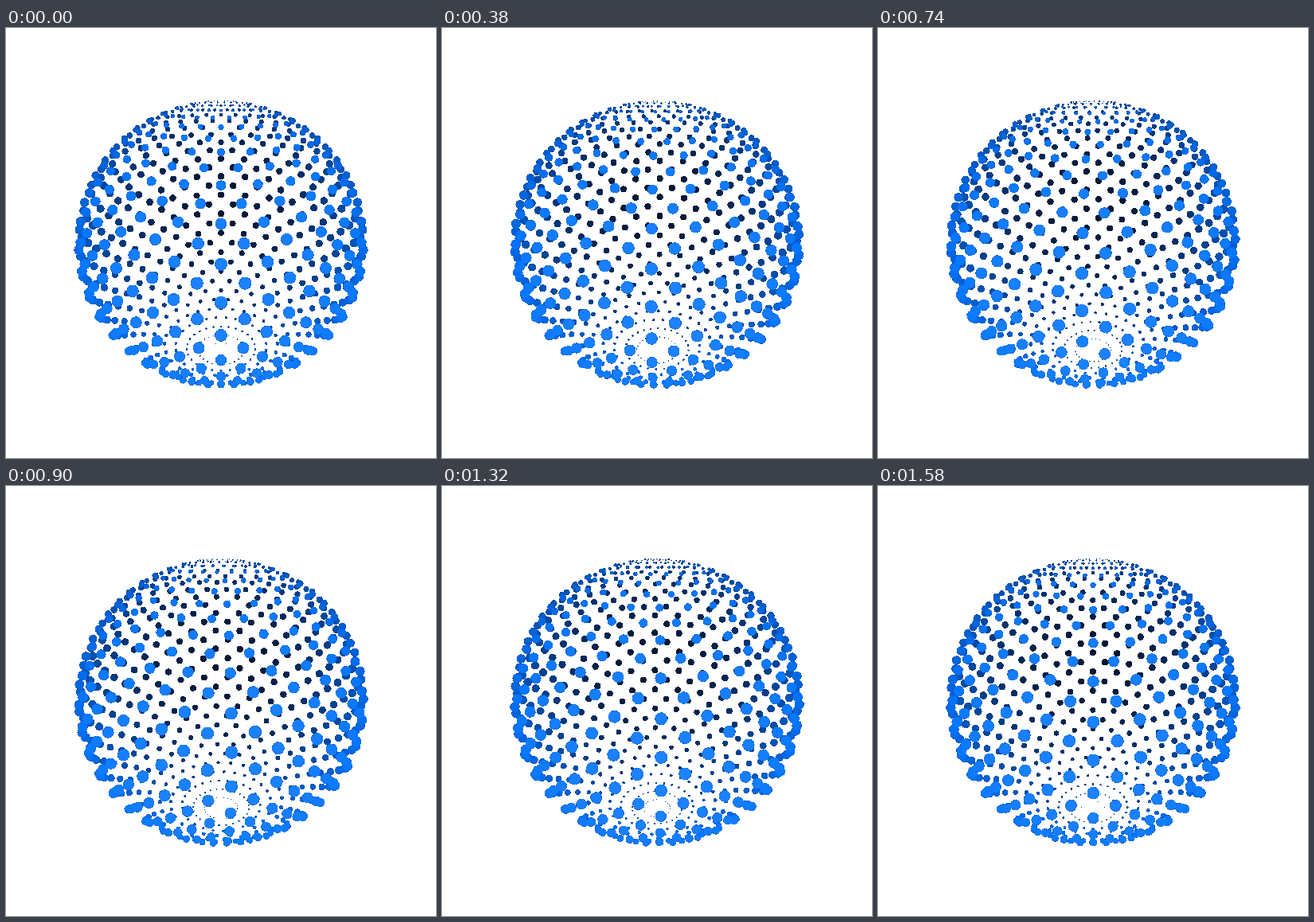
These frames come from a looping animation (540 by 540 pixels, 1.6 s). An HTML page with a canvas:

```html
<!DOCTYPE html>
<html lang="en">
<head>
<meta charset="utf-8">
<title>Dotted sphere</title>
<style>
  html, body { margin: 0; height: 100%; overflow: hidden; background: #fff; }
  canvas { display: block; }
</style>
</head>
<body>
<canvas id="stage" width="540" height="540"></canvas>
<script>
const SIZE = 540, CENTER = SIZE / 2;
const ctx = document.getElementById('stage').getContext('2d', { willReadFrequently: true });
const LOOP = 1600, STEP = 20;
const ROWS = 32, PER_ROW = 26;
const FOCAL = 467.65, DISTANCE = 2.8;
const DOT = 0.0323;
const AXIS = 67.2 * Math.PI / 180; // angle between the pole and the line of sight
const sinA = Math.sin(AXIS), cosA = Math.cos(AXIS);

function makeDot(row, k) {
  const theta = Math.PI * row / ROWS;
  const phi = 2 * Math.PI / PER_ROW * (k - (row - 13) / 2);
  const up = Math.cos(theta), ring = Math.sin(theta);
  const side = ring * Math.sin(phi), front = ring * Math.cos(phi);
  const depth = up * cosA + front * sinA;
  const scale = FOCAL / (DISTANCE - depth);
  return {
    x: CENTER + side * scale,
    y: CENTER - (up * sinA - front * cosA) * scale,
    r: DOT * ring * scale,
    depth, front
  };
}

function shade(front) {
  const b = 0.2 + 0.8 * Math.min(1, (front + 1) / 1.5);
  const glow = Math.max(0, front - 0.4) / 0.6;
  return `rgb(${28 * glow},${116 * b + 14 * glow},${255 * b})`;
}

// Hard-edged dots: soft edge pixels darken or drop out to white.
function hardenEdges() {
  const image = ctx.getImageData(0, 0, SIZE, SIZE), px = image.data;
  for (let i = 0; i < px.length; i += 4) {
    const alpha = px[i + 3];
    const solid = alpha >= 128;
    for (let c = i; c < i + 3; c++) px[c] = solid ? px[c] * alpha / 255 : 255;
    px[i + 3] = 255;
  }
  ctx.putImageData(image, 0, 0);
}

function draw(progress) {
  const dots = [];
  for (let n = 0; n < ROWS; n++)
    for (let k = 0; k < PER_ROW; k++) dots.push(makeDot(n + progress, k));
  dots.sort((a, b) => a.depth - b.depth);

  ctx.clearRect(0, 0, SIZE, SIZE);
  for (const d of dots) {
    ctx.beginPath();
    ctx.arc(d.x, d.y, d.r, 0, 2 * Math.PI);
    ctx.fillStyle = shade(d.front);
    ctx.fill();
  }
  hardenEdges();
}

function tick() {
  const time = performance.now() % LOOP;
  draw(Math.floor(time / STEP) * STEP / LOOP);
  requestAnimationFrame(tick);
}
tick();
</script>
</body>
</html>
```
